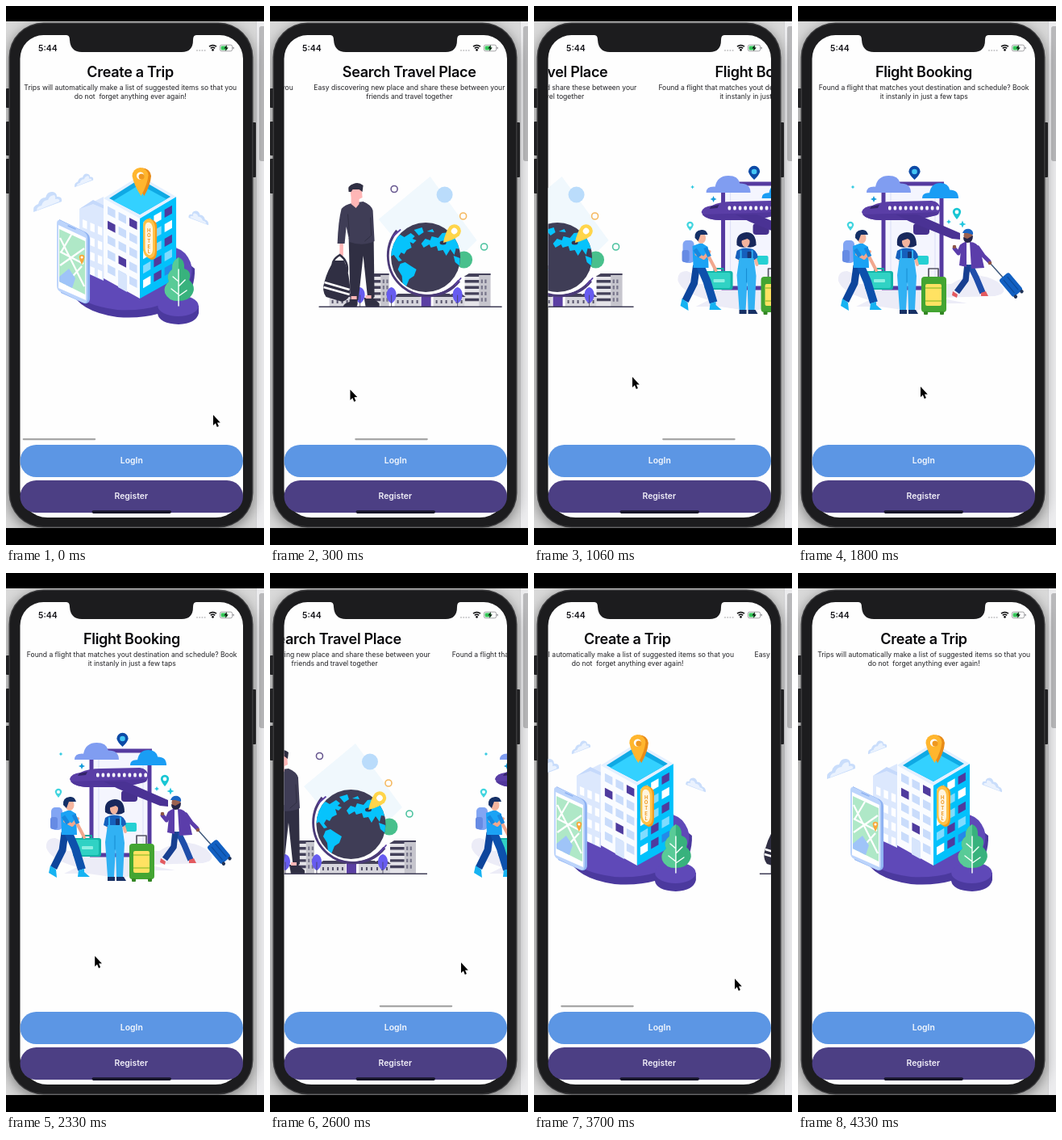
An HTML page with a canvas that plays this animation: 320 by 667 pixels, repeating every 5.36 s.

```html
<!DOCTYPE html>
<html lang="en">
<head>
<meta charset="utf-8">
<title>Travel onboarding</title>
<style>
html, body { margin: 0; width: 100%; height: 100%; overflow: hidden; background: #000; }
canvas { display: block; width: 320px; height: 667px; }
</style>
</head>
<body>
<canvas id="stage"></canvas>
<script>
const W = 320, H = 667, LOOP = 5360, PAGE = 276;
const FONT = 'Inter, Roboto, sans-serif';
const canvas = document.getElementById('stage');
const ctx = canvas.getContext('2d');
const dpr = window.devicePixelRatio || 1;
canvas.width = W * dpr;
canvas.height = H * dpr;

// --- drawing helpers ---
function rect(color, x, y, w, h, r = 0) {
  ctx.fillStyle = color;
  ctx.beginPath();
  ctx.roundRect(x, y, w, h, r);
  ctx.fill();
}
function circle(color, x, y, rx, ry = rx) {
  ctx.fillStyle = color;
  ctx.beginPath();
  ctx.ellipse(x, y, rx, ry, 0, 0, 7);
  ctx.fill();
}
function ring(color, x, y, r, w = 1.6) {
  ctx.strokeStyle = color;
  ctx.lineWidth = w;
  ctx.beginPath();
  ctx.arc(x, y, r, 0, 7);
  ctx.stroke();
}
function shape(color, d) {
  ctx.fillStyle = color;
  ctx.fill(new Path2D(d));
}
function line(color, w, d, cap = 'round') {
  ctx.strokeStyle = color;
  ctx.lineWidth = w;
  ctx.lineCap = cap;
  ctx.lineJoin = 'round';
  ctx.stroke(new Path2D(d));
}
function text(str, x, y, size, weight, color = '#111116', spacing = 0) {
  ctx.font = `${weight} ${size}px ${FONT}`;
  ctx.letterSpacing = spacing + 'px';
  ctx.textAlign = 'center';
  ctx.fillStyle = color;
  ctx.fillText(str, x, y);
}
function within(setup, draw) {
  ctx.save();
  setup();
  draw();
  ctx.restore();
}
function pin(color, hole, x, y, r, length, turn = 0) {
  within(() => { ctx.translate(x, y); ctx.rotate(turn); }, () => {
    shape(color, `M${-r} 0A${r} ${r} 0 1 1 ${r} 0Q${r * .85} ${length * .45} 0 ${length}Q${-r * .85} ${length * .45} ${-r} 0Z`);
    circle(hole, 0, 0, r * .46);
  });
}
function sparkle(color, x, y, r) {
  shape(color, `M${x} ${y - r}L${x + r * .3} ${y - r * .3}L${x + r} ${y}L${x + r * .3} ${y + r * .3}L${x} ${y + r}L${x - r * .3} ${y + r * .3}L${x - r} ${y}L${x - r * .3} ${y - r * .3}Z`);
}

// --- page 1: hotel trip ---
function isoCloud(x, y, s) {
  within(() => { ctx.translate(x, y); ctx.scale(s, s); }, () => {
    shape('#c9ddfb', 'M0 26Q-1 18 6 16Q8 8 15 8Q17 0 24 1Q29 2 29 7Q36 6 35 13Z');
    shape('#eaf2fe', 'M4 24Q4 19 10 18Q12 11 18 11Q20 5 26 5Q28 7 27 10Q33 9 32 13Z');
  });
}
// Windows on a skewed wall, one character per pane.
function windows(x, y, slope, rows, colors, step) {
  within(() => { ctx.translate(x, y); ctx.transform(1, slope, 0, 1, 0, 0); }, () => {
    rows.forEach((row, r) => [...row].forEach((key, c) => {
      if (colors[key]) rect(colors[key], 5 + c * step, 7 + r * 18, step - 4, 10);
    }));
  });
}
function drawTrip() {
  isoCloud(36, 229, 1);
  isoCloud(87, 207, .66);
  within(() => { ctx.translate(253, 253); ctx.scale(-1, 1); }, () => isoCloud(0, 0, .7));

  shape('#4b399e', 'M83 352Q92 378 140 385Q190 389 220 366Q237 351 236 325L205 300L83 345Z');
  shape('#5f49b8', 'M83 350Q94 370 140 376Q196 379 222 352Q242 327 224 306Q211 294 186 296L100 330Z');
  shape('#4b399e', 'M190 372V381Q192 393 216 394Q238 393 241 380V371Z');
  circle('#5f49b8', 215.5, 371, 25.3, 13);

  shape('#dce8fd', 'M93 251L123 236V340L93 326Z');
  shape('#c5d9fb', 'M93 251L110 240L124 247V251L110 245Z');
  windows(92, 255, .42, ['aaa', 'aaa', 'aaa', 'aaa'], { a: '#fff' }, 9.4);

  shape('#fafcff', 'M123 238L168 262V362L123 337Z');
  shape('#02c1fb', 'M168 262L213 236V337L168 362Z');
  shape('#e4f0ff', 'M123 238L168 210L213 236L168 263Z');
  shape('#0fa9e4', 'M130 238L168 214L206 236L168 258Z');
  shape('#33d1ff', 'M135 241L168 221L201 239L168 258Z');
  windows(123, 238, .53, ['aap', 'paa', 'aaa', 'apa', 'aaa'], { a: '#c9dcfb', p: '#4f3b9e' }, 13.5);
  windows(167, 263, -.57, ['awp', 'paw', 'wap', 'apa', 'wpb'], { a: '#7fdcff', w: '#fff', p: '#4f3b9e', b: '#2589e8' }, 13.3);
  shape('#d7e5fc', 'M141 327L152 333V354L141 348Z');

  shape('#f39a1d', 'M174 267Q178 259 187 267Q190 270 189 278V304Q189 314 182 314Q174 310 173 302Z');
  shape('#ffc247', 'M172 270Q174 262 182 264Q187 268 187 276V304Q186 313 179 312Q172 309 172 300Z');
  shape('#fff5df', 'M174.5 273Q175 267 180 268Q184 270 184 277V302Q183 309 179 308Q174.5 306 174.5 299Z');
  [...'HOTEL'].forEach((ch, i) => text(ch, 179.3, 279.5 + i * 6.7, 6, 700, '#f09a25'));

  pin('#e88b18', '#fff', 171.5, 211, 10.5, 24, -.08);
  pin('#ffb62e', '#fff', 168.5, 210, 10, 25, -.04);
  circle('#ef9820', 170, 211, 3.5);

  shape('#8fb3f2', 'M68 264L101 280Q106 283 106 289V363Q105 369 99 368L70 355Z');
  shape('#bcd4fb', 'M65 269Q65 263 71 266L98 279Q103 282 103 287V362Q103 369 97 367L70 354Q65 352 65 346Z');
  shape('#fff', 'M67 271L101 287V364L67 349Z');
  shape('#afe8c7', 'M68 276L100 291V357L68 341Z');
  line('#fff', 2.2, 'M69 321L99 300M69 287L99 347M83 283L70 305M75 345L96 322M69 304L98 319', 'butt');
  shape('#9fc4f8', 'M68 335L80 325L88 337L84 349L68 341Z');
  pin('#f7a93a', '#fff', 96, 311, 3.3, 9);
  line('#8fb3f2', 1.5, 'M79 272L88 276');

  shape('#38b27d', 'M216 311Q224 314 223 325Q233 328 229 339Q239 348 232 358Q228 365 216 365Q203 365 199 355Q197 347 204 341Q200 332 208 326Q207 316 216 311Z');
  shape('#59cb97', 'M216 311Q207 316 208 326Q200 332 204 341Q197 347 199 355Q203 365 216 365Z');
  line('#f4fff9', 1.5, 'M216 326V371M216 341L209 335M216 347L224 339M216 357L207 350M216 359L226 352');
}

// --- page 2: globe and traveller ---
function house(x, y, w) {
  const front = w * .55;
  rect('#e4e3e8', x, y + 2, front, 370 - y);
  rect('#c6c5cd', x + front, y, w - front, 372 - y);
  shape('#44415a', `M${x - 1} ${y + 4}L${x + 5} ${y}H${x + w}V${y + 2}H${x + front}V${y + 4}Z`);
  for (let r = y + 8; r < 366; r += 7.6) {
    rect('#44415a', x, r, front, 3.4);
    for (let c = 0; c < 2; c++) rect('#77758a', x + front + 2.5 + c * 4.6, r - .5, 2.2, 4.4);
  }
}
function hut(x, w) {
  shape('#44415a', `M${x - 1} 360L${x + 4} 356H${x + w - 4}L${x + w + 1} 360Z`);
  rect('#d6d5dc', x, 360, w, 12);
  for (let c = 3; c < w - 3; c += 6) rect('#55526a', x + c, 364, 2, 4);
}
function bush(x) {
  shape('#675cf0', `M${x} 348C${x + 8} 350 ${x + 8} 364 ${x} 368C${x - 8} 364 ${x - 8} 350 ${x} 348Z`);
  line('#44415a', .8, `M${x} 358V372`);
}
function drawSearch() {
  shape('#f0f8fd', 'M182 211L240 290L185 345L118 264Z');
  circle('#badcfb', 200, 233.5, 10);
  ring('#67578f', 137.5, 226.5, 4);
  ring('#f5b961', 223, 260, 4);
  ring('#4dc3a0', 249, 298, 4);
  circle('#48c08c', 224, 314, 10.5);

  house(108, 331, 23);
  house(225, 331, 32);
  hut(57, 32);
  hut(138, 32);
  hut(186, 24);
  hut(205, 20);
  bush(95);
  bush(134);
  bush(216);

  rect('#5b3fa3', 171, 358, 12, 14);
  line('#4b3a78', 3.6, 'M141 278A48 48 0 1 0 218 340', 'butt');
  line('#fff', 2.4, 'M143 280A46 46 0 1 0 214 339', 'butt');
  line('#5b3fa3', 1.8, 'M136 285L145 277M213 345L220 337');
  circle('#3f3d56', 176.5, 311, 43);
  within(() => { ctx.beginPath(); ctx.arc(176.5, 311, 43, 0, 7); ctx.clip(); }, () => {
    shape('#06c3fc', 'M133 302L137 288L145 283L150 286L158 281L163 285L160 288L165 290L161 294L157 292L159 299L153 302L150 307L146 305L143 310L147 315L143 316L137 308L133 310Z');
    shape('#06c3fc', 'M145 319L151 317L157 321L165 326L162 334L156 338L152 348L148 344L147 334L142 326Z');
    shape('#06c3fc', 'M171 294L176 288L182 290L184 285L192 287L197 281L207 280L214 287L220 301L214 300L212 308L207 301L202 309L198 302L192 303L190 297L183 299L181 295L174 299Z');
    shape('#06c3fc', 'M162 277L172 274L174 280L168 284ZM178 279L185 276L187 280Z');
    shape('#06c3fc', 'M211 309L219 312V322L213 317Z');
  });
  circle('#35334c', 198, 293, 4, 2.5);
  pin('#ffd54a', '#fff', 212, 278.5, 8.2, 20, .76);

  // traveller
  shape('#302f43', 'M81 287H112L113 360L105 366L99 309L93 364H83Z');
  shape('#302f43', 'M82 363H92V369L91 372H74Q75 368 82 366Z');
  shape('#302f43', 'M100 361H111L119 368V372H102Z');
  rect('#ffb6b6', 84, 359, 7, 4);
  rect('#ffb6b6', 102, 358, 7, 4);
  line('#ffb6b6', 4.5, 'M72 289L72 308');
  shape('#3f3d56', 'M85 244L99 242Q109 246 111 253L113 291Q98 298 82 292L78 273L76 294H67Q68 266 72 251Q76 246 85 244Z');
  line('#302f43', 1, 'M80 258L82 284M108 262L109 284L101 291');
  shape('#ffb6b6', 'M83 228Q84 221 97 224L98 237L94 239V245L90 250L84 245V237Z');
  shape('#302f43', 'M81 230Q79 222 87 220Q93 217 99 222L98 230L94 227H86L84 230Z');

  line('#302f43', 2.5, 'M70 308Q58 315 62 326M70 308Q81 316 79 329');
  shape('#302f43', 'M63 315H75Q81 325 83 352Q83 363 73 366L53 360Q47 352 51 341Q55 326 63 315Z');
  line('#fff', 2.6, 'M51 342L82 351M50 348L82 357', 'butt');
  line('#3f3d56', 1.6, 'M44 372.3H271', 'butt');
}

// --- page 3: airport ---
function cloud(color, x, y, w, h) {
  shape(color, `M${x} ${y + h}Q${x} ${y + h * .62} ${x + w * .2} ${y + h * .65}Q${x + w * .25} ${y} ${x + w * .5} ${y}Q${x + w * .72} ${y} ${x + w * .76} ${y + h * .45}Q${x + w} ${y + h * .45} ${x + w} ${y + h}Z`);
}
function drawFlight() {
  shape('#ececf7', 'M50 340Q49 328 61 328Q72 331 76 344H190Q220 325 247 341Q265 355 244 359L174 361L210 368H174L144 378L102 372H72L88 364Q54 354 50 340Z');
  rect('#f4f5fe', 106, 219, 73, 130);
  line('#553aa0', 5, 'M106 220V349M178 220V349M104 220H181M104 349H181', 'butt');
  line('#dfe2f8', 1.2, 'M115 226V345M170 226V345');
  cloud('#809df1', 85, 210, 55, 21);
  cloud('#1a9df4', 154, 219, 45, 19);
  pin('#0d4aa6', '#43c6f5', 144.5, 205, 7.2, 10);
  pin('#19c6d3', '#fff', 197, 255, 5.2, 9);
  pin('#41d5df', '#fff', 65, 271, 4.3, 7);
  sparkle('#159cda', 94, 239, 4);
  sparkle('#23c6df', 204, 270, 4.5);
  sparkle('#23c6df', 68, 224, 2.5);
  sparkle('#23c6df', 187, 267, 3);

  shape('#5a3ea6', 'M79 255Q81 248 92 247Q102 242 118 242L166 241Q175 242 177 251L174 258L146 265H101Q82 264 79 255Z');
  shape('#50369b', 'M80 258L175 255L172 259L146 265H101Q85 264 80 258Z');
  shape('#322468', 'M91 248L101 246L99 250L89 251Z');
  for (let x = 112; x < 172; x += 6.6) rect('#fff', x, 247.5, 3.6, 5, 1.5);
  rect('#46308d', 143, 269, 20, 14, 4);
  shape('#4a3294', 'M121 258H148L201 281V289L191 288L139 267Z');

  // traveller with a teal case
  rect('#82a5f3', 56, 290, 14, 28, 5);
  rect('#668be4', 55, 302, 9, 15, 3);
  line('#12a79f', 2, 'M95 330V325H106V330');
  rect('#13b5a8', 83, 328, 35, 23, 3);
  rect('#30d2c4', 86, 330, 29, 19, 2);
  rect('#8cefe2', 94, 338, 14, 4, 1);
  line('#0d459c', 9, 'M73 321L70 343L59 365', 'butt');
  line('#0d51ac', 10, 'M77 320L86 341L94 367', 'butt');
  shape('#16b3f2', 'M55 362L62 367L63 377L53 371Z');
  shape('#16b3f2', 'M90 368L97 366V370L104 376H89Z');
  shape('#1ba3f5', 'M68 297L79 293L87 298L88 324H69Z');
  line('#f2a78d', 4, 'M73 307L82 312L89 304M86 306L97 327');
  line('#1688df', 5, 'M71 301L77 310M84 299L89 310', 'butt');
  circle('#f6b69f', 79, 287, 5.5, 7);
  shape('#153066', 'M71 287Q70 278 79 277Q85 276 87 283L78 283L75 291Z');

  // woman with a phone
  rect('#25d0d3', 146, 309, 16, 11, 2);
  line('#f3b39d', 4, 'M126 309L127 316L137 309M145 310L148 320');
  shape('#1560bd', 'M123 303Q130 298 139 300Q148 301 149 311L145 314H125L121 312Z');
  shape('#31b1f3', 'M126 312H144L147 334L145 376H137L136 341L134 376H126L123 333Z');
  line('#31b1f3', 2, 'M128 303V314M142 303V314');
  line('#168bd2', 1, 'M135 325V342');
  shape('#173064', 'M126 376H135V381H126ZM137 376H146L149 381H137Z');
  shape('#18285c', 'M123 296Q121 281 135 280Q147 280 147 296Q142 300 135 298Q128 300 123 296Z');
  circle('#f3b39d', 134, 292, 5, 6.5);
  shape('#18285c', 'M127 291Q130 283 136 283L141 291L136 288Z');
  rect('#183675', 136, 304, 5, 8, 1);

  // green case
  line('#555564', 1.7, 'M162 336V325H174V336');
  rect('#43a532', 153, 335, 31, 44, 4);
  rect('#348725', 156, 378, 5, 4, 1);
  rect('#348725', 176, 378, 5, 4, 1);
  rect('#ffe262', 158, 344, 20, 27, 2);
  line('#a7c634', 1.5, 'M158 349H178M158 365H178', 'butt');

  // man pulling a case
  line('#405a7c', 1.5, 'M239 319L256 338');
  within(() => { ctx.translate(264, 345); ctx.rotate(-.7); }, () => {
    rect('#1260c2', -8, -14, 16, 28, 3);
    line('#0c4b9c', 1.2, 'M-3 -10V10M3 -10V10');
    circle('#203357', -5, 15, 2.2);
    circle('#203357', 5, 15, 2.2);
  });
  line('#1f4eaa', 7.5, 'M213 320L221 336L229 355', 'butt');
  line('#173f91', 7.5, 'M210 320L208 339L197 354', 'butt');
  shape('#e35a5f', 'M192 353L198 357L197 361L191 358ZM227 355L233 353L236 359H227Z');
  shape('#fff', 'M205 295L216 292L219 320H206Z');
  shape('#5b3daa', 'M203 294L209 291L209 323L200 321ZM213 292Q222 292 226 301L231 324L215 325Z');
  line('#5b3daa', 5, 'M223 299L230 309L237 316M203 297L199 306L194 300');
  circle('#8d5547', 238, 318, 2.3);
  circle('#8d5547', 194, 298, 2.3);
  circle('#9b6150', 211, 284, 5.5, 7);
  shape('#252448', 'M205 286L210 288L217 284Q217 293 210 293Q205 292 205 286Z');
  shape('#1c65c3', 'M204 281Q206 275 213 276Q218 278 217 283L210 281Z');
}

const pages = [
  { title: 'Create a Trip', lines: ['Trips will automatically make a list of suggested items so that you', 'do not  forget anything ever again!'], draw: drawTrip },
  { title: 'Search Travel Place', lines: ['Easy discovering new place and share these between your', 'friends and travel together'], draw: drawSearch },
  { title: 'Flight Booking', lines: ['Found a flight that matches yout destination and schedule? Book', 'it instanly in just a few taps'], draw: drawFlight }
];

// --- motion ---
const swipes = [
  { start: -5, end: 525, from: 0, to: 1 },
  { start: 900, end: 1430, from: 1, to: 2 },
  { start: 2358, end: 2980, from: 2, to: 1 },
  { start: 3455, end: 3970, from: 1, to: 0 }
];
// Finger drag first, then a decelerating glide to the page edge.
function swipeEase(u) {
  if (u <= .35) return .53 * Math.pow(u / .3, 1.25);
  return 1 - .357 * Math.pow(1 - (u - .35) / .65, 4.18);
}
function scrollAt(t) {
  let s = swipes[0];
  for (const next of swipes) if (t >= next.start) s = next;
  const u = Math.min(1, (t - s.start) / (s.end - s.start));
  const fade = Math.min(1, Math.max(0, (s.end + 350 - t) / 240));
  return { offset: PAGE * (s.from + (s.to - s.from) * swipeEase(u)), fade };
}
const pointerKeys = [
  [0, 257, 506], [200, 118, 484], [320, 98, 474], [650, 226, 476], [800, 236, 477], [900, 236, 477],
  [1060, 122, 459], [1160, 98, 459], [1660, 152, 471], [1860, 152, 471], [2350, 110, 474],
  [2600, 237, 482], [2720, 255, 485], [3250, 126, 477], [3455, 126, 477], [3700, 249, 502], [3950, 264, 521], [4060, 264, 521]
];
function pointerAt(t) {
  const i = pointerKeys.findIndex(k => k[0] > t);
  if (i < 0) return null;
  const [t0, x0, y0] = pointerKeys[i - 1], [t1, x1, y1] = pointerKeys[i];
  const u = (t - t0) / (t1 - t0), e = u * u * (3 - 2 * u);
  return [x0 + (x1 - x0) * e, y0 + (y1 - y0) * e];
}

// --- scene ---
function drawDevice() {
  rect('#d9d9d9', 0, 19, W, 627);
  rect('#ececee', 310, 19, 10, 627);
  rect('#d0d0d2', 310, 19, 1, 627);
  rect('#b9b9bb', 314, 25, 8, 167, 3);
  [[0, 102, 24], [0, 143, 42], [0, 189, 43], [304, 144, 68]].forEach(([x, y, h]) => rect('#29292b', x, y, 6, h, 1));
  within(() => { ctx.shadowColor = 'rgba(0,0,0,.45)'; ctx.shadowBlur = 16 * dpr; ctx.shadowOffsetY = 4 * dpr; }, () => {
    rect('#3a3a3c', 3.5, 20.5, 303, 625, 43);
  });
  rect('#1c1c1e', 5, 22, 300, 622, 41);
  rect('#fefefe', 17.5, 36, 276.5, 597, [29, 29, 34, 34]);
  rect('#000', 0, 0, W, 19);
  rect('#000', 0, 646, W, 21);
}
function drawPages(offset, fade) {
  within(() => { ctx.beginPath(); ctx.rect(17.5, 60, 276.5, 482); ctx.clip(); }, () => {
    pages.forEach((page, i) => {
      const x = i * PAGE - offset;
      if (Math.abs(x) >= PAGE) return;
      within(() => ctx.translate(x, 0), () => {
        text(page.title, 156, 87.6, 18, 600, '#08080b', -.3);
        page.lines.forEach((str, n) => text(str, 156.2, 104.4 + n * 10.5, 8.55, 400, '#202024'));
        page.draw();
      });
    });
    ctx.globalAlpha = fade;
    rect('#a6a6a6', 20 + offset * .3286, 535, 90.6, 2.2, 1.1);
  });
}
function drawChrome() {
  shape('#1c1c1e', 'M75 35V36Q79 36 79 42Q80 57 94 57H218Q232 57 232 42Q232 36 236 36V35Z');
  text('5:44', 51.8, 55.8, 10.4, 600);
  for (let i = 0; i < 4; i++) circle('#c4c4c6', 237 + i * 3.2, 55, 1);
  line('#0b0b0d', 1.5, 'M252 50.2Q256.5 46.6 261 50.2M253.8 52.4Q256.5 50.2 259.2 52.4', 'butt');
  circle('#0b0b0d', 256.5, 54.4, 1.3);
  ctx.strokeStyle = '#8e8e92';
  ctx.lineWidth = .8;
  ctx.beginPath();
  ctx.roundRect(265.4, 48.2, 15.2, 7.6, 2);
  ctx.stroke();
  rect('#35c759', 266.6, 49.4, 7.8, 5.2, 1);
  rect('#8e8e92', 281.5, 50.7, 1.2, 2.6, .6);
  shape('#111', 'M274 48L270.4 52.5H272.8L271.8 56L275.8 51.4H273.4Z');

  rect('#5c96e4', 17.5, 543, 276.5, 40, 20);
  rect('#4c3f84', 17.5, 587, 276.5, 40, 20);
  text('LogIn', 155.8, 566.3, 10.4, 600, '#f3f7fd');
  text('Register', 155.3, 610.3, 10.4, 600, '#f1eff8');
  rect('#17152a', 106.5, 624.3, 98.5, 3.6, 1.8);
}
function drawPointer(pos) {
  if (!pos) return;
  within(() => { ctx.translate(...pos); ctx.scale(.86, .92); }, () => {
    const arrow = 'M0 0V14.2L3.3 11.2L5.6 16.2L8 15.1L5.8 10.2H10.2Z';
    line('#fff', 1.8, arrow);
    shape('#000', arrow);
  });
}
function render(now) {
  const t = now % LOOP;
  const { offset, fade } = scrollAt(t);
  ctx.setTransform(dpr, 0, 0, dpr, 0, 0);
  drawDevice();
  drawPages(offset, fade);
  drawChrome();
  drawPointer(pointerAt(t));
}

let begin;
function tick(now) {
  begin ??= now;
  render(Math.max(0, now - begin));
  requestAnimationFrame(tick);
}
render(0);
requestAnimationFrame(tick);
</script>
</body>
</html>
```
